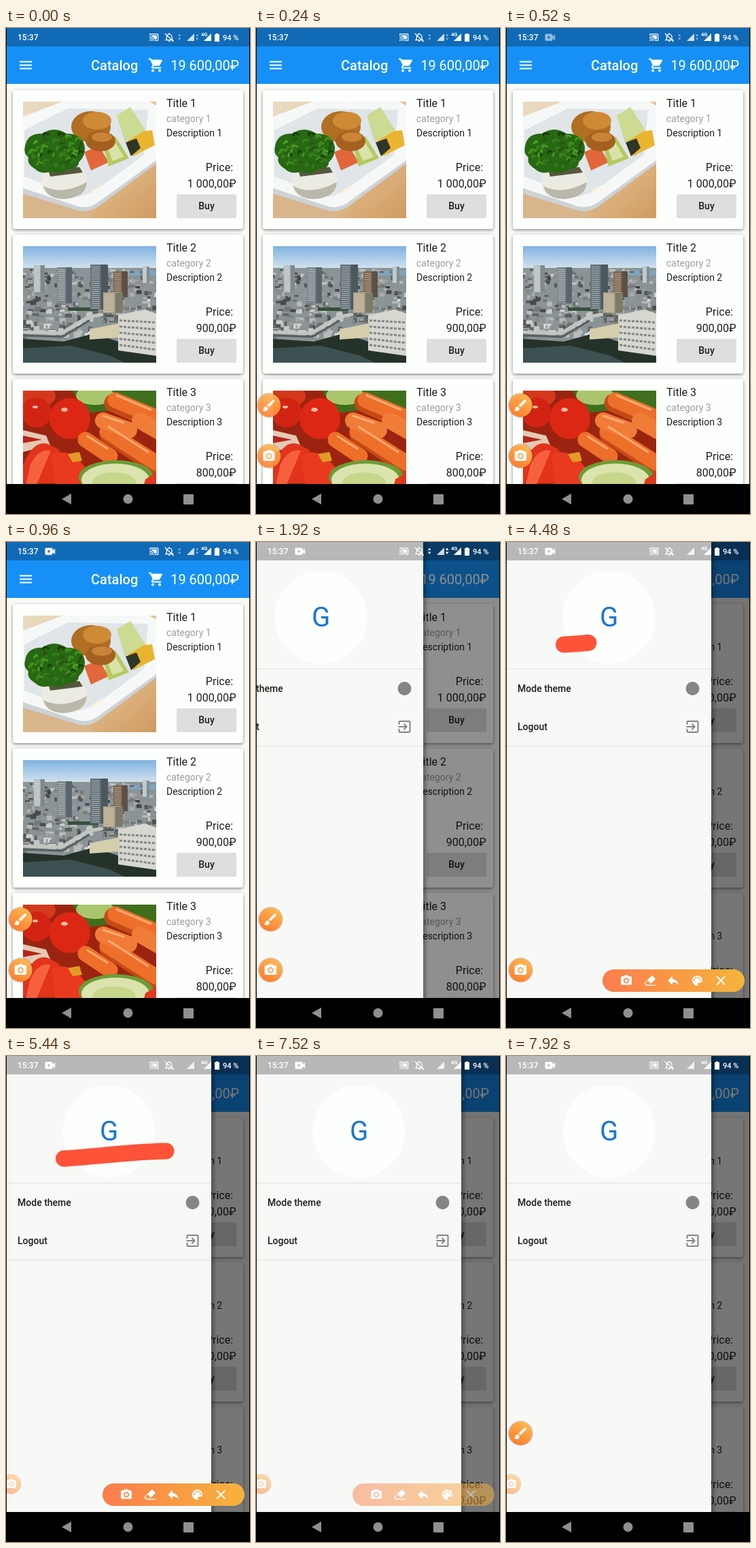
Recreate the animation shown at these times as an HTML page. Size 359 px wide and 713 px high, loop 8 s.

```html
<!DOCTYPE html>
<html lang="en">
<head>
<meta charset="utf-8">
<title>Catalog</title>
<style>
html, body { margin: 0; width: 100%; height: 100%; overflow: hidden; background: #000; }
svg { display: block; width: 100vw; height: 100vh; font-family: Roboto, sans-serif; }
.med { font-weight: 500; }
.end { text-anchor: end; }
.mid { text-anchor: middle; }
.anim { animation: 8s linear infinite; }

#fabs { animation-name: fabs; }
@keyframes fabs {
  0%, .49% { opacity: 0; transform: translateX(-26px); }
  .5% { opacity: .15; transform: translateX(-20px); animation-timing-function: ease-out; }
  4%, 100% { opacity: 1; transform: none; }
}
#rec { animation-name: rec; }
@keyframes rec {
  0%, 3% { opacity: 0; }
  6.5% { opacity: .55; }
  10.5% { opacity: .8; }
  11%, 100% { opacity: 1; }
}
#drawer { animation-name: drawer; }
@keyframes drawer {
  0%, 22.99% { transform: translateX(-315px); }
  23% { transform: translateX(-250px); }
  23.5% { transform: translateX(-150px); }
  24%, 24.99% { transform: translateX(-56px); }
  25% { transform: translateX(-32px); }
  26% { transform: translateX(-11px); }
  28%, 100% { transform: none; }
}
#scrim { animation-name: scrim; }
@keyframes scrim {
  0%, 22.99% { opacity: 0; }
  23% { opacity: .09; }
  23.5% { opacity: .27; }
  24%, 24.99% { opacity: .44; }
  25% { opacity: .48; }
  26% { opacity: .52; }
  28%, 100% { opacity: .54; }
}
#data { animation-name: data; }
@keyframes data {
  0%, 22.99% { opacity: .45; }
  23%, 34.99% { opacity: 1; }
  35%, 100% { opacity: 0; }
}
#brush { animation-name: brush; }
@keyframes brush {
  0%, 34.99% { opacity: 1; }
  36.5%, 97.49% { opacity: 0; }
  97.5%, 98.99% { opacity: .5; }
  99%, 100% { opacity: 1; }
}
#camera { animation-name: camera; transform-origin: 21px 628px; }
@keyframes camera {
  0%, 65% { opacity: 1; transform: none; }
  68%, 100% { opacity: .5; transform: translateX(-14px) scale(.83); }
}
#tools { animation-name: tools; }
@keyframes tools {
  0%, 34.99% { opacity: 0; transform: translateX(60px); }
  35% { opacity: .1; transform: translateX(50px); animation-timing-function: ease-out; }
  38.5%, 93.99% { opacity: 1; transform: none; }
  94%, 95.49% { opacity: .5; transform: none; }
  95.5%, 100% { opacity: 0; transform: none; }
}
#stroke { animation-name: stroke; stroke-dasharray: 1 2; }
@keyframes stroke {
  0%, 54.99% { opacity: 0; stroke-dashoffset: .95; }
  55% { opacity: 1; stroke-dashoffset: .95; }
  60%, 93.99% { opacity: 1; stroke-dashoffset: 0; }
  94%, 100% { opacity: 0; stroke-dashoffset: 0; }
}
</style>
</head>
<body>
<svg viewBox="0 0 359 713" preserveAspectRatio="none">
  <defs>
    <linearGradient id="fabFill" x1="0" y1="1" x2=".6" y2="0">
      <stop stop-color="#ff7427"/><stop offset="1" stop-color="#ffb552"/>
    </linearGradient>
    <linearGradient id="barFill">
      <stop stop-color="#fb7d4d"/><stop offset="1" stop-color="#f6b43c"/>
    </linearGradient>
    <linearGradient id="edge">
      <stop stop-opacity=".3"/><stop offset="1" stop-opacity="0"/>
    </linearGradient>
    <linearGradient id="wood" x1="0" y1="0" x2="1" y2="1">
      <stop stop-color="#e9dcc4"/><stop offset=".5" stop-color="#e6c594"/><stop offset="1" stop-color="#d09a62"/>
    </linearGradient>
    <linearGradient id="sky" x2="0" y2="1">
      <stop stop-color="#7fb2e0"/><stop offset="1" stop-color="#dbe7ef"/>
    </linearGradient>
    <clipPath id="frame"><path d="M0 0h196v171H0z"/></clipPath>
    <clipPath id="screen"><path d="M1 0h357v669H1z"/></clipPath>
    <filter id="shadow" x="-5%" y="-5%" width="110%" height="115%">
      <feDropShadow dx="0" dy="1.5" stdDeviation="1.9" flood-opacity=".48"/>
    </filter>

    <path id="iMenu" d="M3 18h18v-2H3zM3 13h18v-2H3zM3 6v2h18V6z"/>
    <g id="iCart">
      <circle cx="7" cy="20" r="2"/><circle cx="17" cy="20" r="2"/>
      <path d="M1 2v2h2l3.6 7.6-1.35 2.4C4.5 15.4 5.5 17 7 17h12v-2H7.4c-.2 0-.3-.2-.2-.4l.9-1.6h7.45c.75 0 1.4-.4 1.75-1l3.6-6.5c.3-.7-.1-1.5-.9-1.5H5.2l-.95-2z"/>
    </g>
    <path id="iExit" d="M10.1 15.6l1.4 1.4 5-5-5-5-1.4 1.4 2.6 2.6H3v2h9.7zM19 3H5a2 2 0 0 0-2 2v4h2V5h14v14H5v-4H3v4a2 2 0 0 0 2 2h14a2 2 0 0 0 2-2V5a2 2 0 0 0-2-2z"/>
    <path id="iCast" d="M21 3H3a2 2 0 0 0-2 2v3h2V5h18v14h-7v2h7a2 2 0 0 0 2-2V5a2 2 0 0 0-2-2zM1 18v3h3a3 3 0 0 0-3-3zm0-4v2a5 5 0 0 1 5 5h2a7 7 0 0 0-7-7zm0-4v2a9 9 0 0 1 9 9h2A11 11 0 0 0 1 10zM5 7v1.6c4 1.3 7.1 4.4 8.4 8.4H19V7z"/>
    <g id="iBell" fill="none" stroke="#fff" stroke-width="2">
      <path d="M4 18h16l-2-2v-5a6 6 0 0 0-12 0v5zM12 5V2M10 21h4M2 3l20 19"/>
    </g>
    <g id="iPhoto">
      <path d="M9 2L7.2 4H4a2 2 0 0 0-2 2v12a2 2 0 0 0 2 2h16a2 2 0 0 0 2-2V6a2 2 0 0 0-2-2h-3.2L15 2zm3 15a5 5 0 1 1 0-10 5 5 0 0 1 0 10z"/>
      <circle cx="12" cy="12" r="3"/>
    </g>
    <path id="iBrush" d="M7 14a3 3 0 0 0-3 3c0 1.3-1.2 2-2 2 .9 1.2 2.5 2 4 2a4 4 0 0 0 4-4 3 3 0 0 0-3-3zM20.7 4.6l-1.3-1.3a1 1 0 0 0-1.4 0L9 12.3 11.7 15l9-9a1 1 0 0 0 0-1.4z"/>
    <g id="iErase">
      <path d="M15.5 3l6 6L10 20.5H6L2 16.5z"/>
      <path d="M8 11.5l5.5 5.5-2.5 2H7l-3-3z" fill="#fa9448"/>
      <path d="M10 19.2h11v1.5H9z"/>
    </g>
    <path id="iReply" d="M10 9V4l-8 8 8 8v-5c5 0 8.5 1.6 11 5-1-5-4-10-11-11z"/>
    <path id="iPalette" fill-rule="evenodd" d="M12 2a10 10 0 0 0 0 20c1 0 1.7-.8 1.7-1.7 0-1-.8-1.3-.8-2.2 0-.9.7-1.7 1.7-1.7H17a5 5 0 0 0 5-5C22 6 17.5 2 12 2zM6 9a1.7 1.7 0 1 1 0 3.4A1.7 1.7 0 0 1 6 9zm3.300-4.4a1.700 1.7 0 1 1 0 3.4 1.7 1.7 0 0 1 0-3.4zm5.400 0a1.7 1.7 0 1 1 0 3.4 1.7 1.7 0 0 1 0-3.4zM18 9a1.7 1.7 0 1 1 0 3.4A1.7 1.7 0 0 1 18 9z"/>
    <path id="iClose" d="M4 4l16 16M20 4L4 20" stroke="#fff" stroke-width="2.6"/>
    <path id="iVideo" fill-rule="evenodd" d="M17 10V7a2 2 0 0 0-2-2H4a2 2 0 0 0-2 2v10a2 2 0 0 0 2 2h11a2 2 0 0 0 2-2v-3l5 4V6zM9.5 9.5a2.5 2.5 0 1 1 0 5 2.5 2.5 0 0 1 0-5z"/>
    <path id="iArrows" d="M0 5l2.2-3.5L4.4 5zM0 7.5h4.4L2.2 11z"/>

    <g id="photo1">
      <path fill="url(#wood)" d="M0 0h196v171H0z"/>
      <path fill="#d9b58c" d="M0 134l100 30v7H0z"/>
      <path fill="#f6f8f8" d="M0 22L58 0H186l10 6v84l-84 60q-13 11-30 8L0 134z"/>
      <path fill="#dfe5e8" d="M2 42L66 10 184 12l-6 66-74 54-22 8-80-30z"/>
      <path fill="#ccd2d6" d="M0 127l82 27q16 3 28-6l86-62v5l-84 62q-14 10-30 7L0 135z"/>
      <path fill="#ecebe2" d="M28 106q8-18 36-16 26 0 31 26 0 24-36 27-30-2-31-22z"/>
      <path fill="#55583f" d="M37 100l46-4 5 8-48 6z"/>
      <path fill="#b9b8aa" d="M30 124q28 14 64-6-1 23-35 25-24-1-29-19z"/>
      <path fill="#e2673a" d="M90 74l22-9 14 24-26 12z"/>
      <path fill="#e9b531" d="M150 46l40-4 4 22-32 16z"/>
      <path fill="#2f3626" d="M151 60l16-6 6 14-14 12z"/>
      <path fill="#b4c95f" d="M116 58l20-7 20 32-30 12z"/>
      <path fill="#d9e3a9" d="M122 62l12-5 14 24-16 6z"/>
      <path fill="#cdda92" d="M138 20l20-12 22 34-30 18z"/>
      <ellipse fill="#b06f22" cx="100" cy="37" rx="29" ry="23"/>
      <ellipse fill="#cf8a36" cx="109" cy="28" rx="21" ry="13"/>
      <ellipse fill="#a5601f" cx="114" cy="58" rx="22" ry="15"/>
      <ellipse fill="#c98438" cx="116" cy="52" rx="15" ry="7"/>
      <path fill="#276812" d="M3 66q3-20 25-19 18-12 36 0 24 0 27 20 1 13-9 22 0 10-15 10-14 10-24 3-16 6-25-3-13-8-10-17-8-7-5-16z"/>
      <g id="leaves" fill="none" stroke-width="3" stroke-linecap="round"></g>
      <path fill="#fff3dc" d="M101 131l15-9-2 7-12 6z"/>
    </g>
    <g id="photo2">
      <path fill="url(#sky)" d="M0 0h196v36H0z"/>
      <path fill="#8a9496" d="M0 32h196v139H0z"/>
      <path fill="#7fa5bd" d="M152 36h44v7h-44z"/>
      <g id="city"></g>
      <path fill="#35503a" d="M66 90h45v5H66z"/>
      <g id="towers"></g>
      <path fill="#253229" d="M0 136l60 4 44-12 36 12 56 18v13H0z"/>
      <path fill="#3d5153" d="M0 150l70-4 56 14 24 11H0z"/>
      <path fill="none" stroke="#c3c6bf" stroke-width="5" d="M0 126l56 2 40-24 22-4"/>
      <path fill="none" stroke="#565f61" stroke-width="3" d="M0 131l58 2 40-24"/>
      <path fill="#d7d7cf" d="M140 101l40-8 16 6v62l-56-8z"/>
      <path fill="none" stroke="#7f8886" stroke-width="3" stroke-dasharray="4 2" d="M142 109l54 3M142 118l54 4M142 127l54 5M142 136l54 6M142 145l54 7"/>
      <path fill="#d5ceac" d="M98 122l44-9v21l-44 3z"/>
    </g>
    <g id="photo3">
      <path fill="#9b2410" d="M0 0h196v171H0z"/>
      <path fill="#3f6f1c" d="M72 0h124v35l-54-8-46 6z"/>
      <ellipse fill="#a9c66c" cx="106" cy="7" rx="28" ry="14"/>
      <ellipse fill="#d4391c" cx="20" cy="8" rx="28" ry="17"/>
      <circle fill="#d32413" cx="20" cy="32" r="22"/>
      <circle fill="#dc2714" cx="69" cy="41" r="30"/>
      <g fill="#ffb9a0"><ellipse cx="61" cy="28" rx="5" ry="3"/><ellipse cx="18" cy="24" rx="4" ry="2"/></g>
      <g fill="none" stroke-linecap="round">
        <path stroke="#c44a15" stroke-width="27" d="M133 18l63 28M126 64l70 46"/>
        <path stroke="#ee6f2a" stroke-width="23" d="M136 14l64 27M124 60l72 46M92 72l36 24"/>
        <path stroke="#f17c38" stroke-width="24" d="M118 44l38 14M172 44l28 16"/>
        <path stroke="#ffab70" stroke-width="3" d="M138 7l50 21M118 37l30 10M126 53l58 37M95 67l29 18"/>
      </g>
      <path fill="#e4c9b4" d="M0 58l34 8 6 14-40 10z"/>
      <path fill="#b52619" d="M0 66l28 6-28 5z"/>
      <path fill="#e2331c" d="M0 110q15-38 36-32l16 8 28 50H0z"/>
      <path fill="#f5603d" d="M11 108q12-24 30-20l-21 50H4z"/>
      <path fill="#e93a20" d="M42 94q27-13 52 22l-7 28H48z"/>
      <path fill="#e39b27" d="M66 93l17-3 4 13-14 2z"/>
      <ellipse fill="#6b9d36" cx="137" cy="127" rx="55" ry="25"/>
      <ellipse fill="#dbe3ae" cx="136" cy="131" rx="50" ry="24"/>
      <ellipse fill="#c6d68b" cx="134" cy="134" rx="32" ry="14"/>
      <path fill="#dd3a20" d="M180 130l16-10v51h-26z"/>
    </g>
  </defs>

  <path d="M0 0h359v713H0z"/>
  <g clip-path="url(#screen)">
    <path fill="#f8faf8" d="M0 0h359v670H0z"/>
    <g id="cards"></g>
    <path fill="#1690f6" d="M0 0h359v82H0z"/>
    <g fill="#fff">
      <use href="#iMenu" x="17" y="42.5"/>
      <text x="125" y="62" font-size="20" class="med">Catalog</text>
      <use href="#iCart" x="209" y="42.5"/>
      <text x="343" y="62" font-size="20" class="end">19 600,00₽</text>
    </g>
    <path id="scrim" class="anim" d="M0 0h359v670H0z"/>

    <g id="drawer" class="anim">
      <path fill="url(#edge)" d="M302 0h8v670h-8z"/>
      <path fill="#f7f9f7" d="M-20 0h322v670H-20z"/>
      <circle cx="151.5" cy="110.5" r="68" fill="#fdfffd"/>
      <text x="151.5" y="124" font-size="40" class="mid" fill="#1976d2">G</text>
      <path stroke="#dfe1df" d="M0 186.5h302M0 299.5h302"/>
      <g font-size="14" class="med" fill="#1d1f1d">
        <text x="17" y="220">Mode theme</text>
        <text x="17" y="276">Logout</text>
      </g>
      <g fill="#848684">
        <circle cx="274.5" cy="215" r="10"/>
        <use href="#iExit" x="262.5" y="259"/>
      </g>
    </g>

    <path fill-opacity=".26" d="M0 0h359v27H0z"/>
    <g fill="#fff">
      <text x="17" y="18" font-size="12" class="med">15:37</text>
      <g id="rec" class="anim"><use href="#iVideo" transform="translate(56 5) scale(.73)"/></g>
      <use href="#iCast" transform="translate(210.5 6.5) scale(.6)"/>
      <use href="#iBell" transform="translate(232.5 6) scale(.64)"/>
      <path d="M277 8v11h-11z" fill-opacity=".8"/>
      <path d="M302 8v11h-11z"/>
      <g id="data" class="anim">
        <use href="#iArrows" x="253" y="7"/><use href="#iArrows" x="279" y="7"/>
      </g>
      <text x="287" y="12" font-size="7.5" font-weight="700">4G</text>
      <path d="M307 9h2V8h3v1h2v11h-7z"/>
      <text x="319" y="18" font-size="11" class="med">94 %</text>
    </g>

    <g id="fabs" class="anim">
      <g id="brush" class="anim"></g>
      <g id="camera" class="anim"></g>
    </g>
    <g id="tools" class="anim">
      <rect x="142" y="627" width="209" height="33" rx="16.5" fill="url(#barFill)"/>
    </g>
    <path id="stroke" class="anim" pathLength="1" fill="none" stroke="#ff5339" stroke-width="24" stroke-linecap="round" d="M85 150.5C130 148 175 141 235.5 139.5"/>
  </g>

  <g fill="#8f8f8f">
    <path d="M82 691l14-8v16z"/>
    <circle cx="179.5" cy="691" r="7"/>
    <rect x="261" y="684" width="15" height="15" rx="1"/>
  </g>
</svg>
<script>
const $ = id => document.getElementById(id);
const fill = (id, html) => { $(id).innerHTML += html; };

// 24-unit icon centred on a point
const icon = (name, x, y, size) =>
  `<use href="#${name}" fill="#fff" transform="translate(${x - size / 2} ${y - size / 2}) scale(${size / 24})"/>`;

const fab = (name, y, size) => `
  <circle cx="21.5" cy="${y}" r="18.5" fill-opacity=".16"/>
  <circle cx="21.5" cy="${y}" r="17.2" fill="url(#fabFill)"/>${icon(name, 21.5, y, size)}`;

const card = (price, i) => `
  <g transform="translate(0 ${i * 212})" fill="#1d1f1d">
    <rect x="10" y="91" width="339" height="204" rx="4" fill="#fdfffd" filter="url(#shadow)"/>
    <g transform="translate(25 108)" clip-path="url(#frame)"><use href="#photo${i + 1}"/></g>
    <text x="236" y="116" font-size="16">Title ${i + 1}</text>
    <text x="236" y="137.5" font-size="14" fill="#9c9e9c">category ${i + 1}</text>
    <text x="236" y="158.5" font-size="14">Description ${i + 1}</text>
    <text x="334" y="210" font-size="16" class="end">Price:</text>
    <text x="338.5" y="234" font-size="16" class="end">${price}₽</text>
    <rect x="251" y="244" width="88" height="35" rx="2" fill="#dddfdd"/>
    <text x="295" y="266" font-size="14" class="med mid">Buy</text>
  </g>`;

let seed = 11;
const rand = () => (seed = (seed * 16807) % 2147483647) / 2147483647;
const box = (x, y, w, h, color) => `<rect x="${x}" y="${y}" width="${w}" height="${h}" fill="${color}"/>`;

// Curly greens scattered over an oval
let leaves = '';
for (let i = 0; i < 70; i++) {
  const a = rand() * 7, r = Math.sqrt(rand());
  const x = 47 + Math.cos(a) * r * 40, y = 73 + Math.sin(a) * r * 26;
  leaves += `<path d="M${x} ${y}q${rand() * 8 - 4} -6 ${rand() * 8} -2" stroke="hsl(102 65% ${14 + rand() * 26}%)"/>`;
}
fill('leaves', leaves);

// Roofs get larger toward the river
let city = '';
for (let i = 0; i < 330; i++) {
  const depth = i / 330, tone = 55 + depth * 20 + rand() * 150;
  city += box(rand() * 200 - 4, 33 + depth * 98, 3 + rand() * (4 + depth * 6), 2 + rand() * (3 + depth * 5),
    `rgb(${tone},${tone + 3},${tone + 2})`);
}
fill('city', city);

const tower = ([x, y, w, h, color]) =>
  box(x, y, w, h, color) + box(x + w * .6, y, w * .4, h, 'rgba(20,35,45,.35)') +
  `<path d="M${x + w * .3} ${y + 3}v${h - 5}" stroke="#e2e5e3" stroke-opacity=".5" stroke-width="${w * .45}" stroke-dasharray="1 2"/>`;
fill('towers', [
  [16, 28, 16, 40, '#b9bfc0'], [50, 31, 22, 53, '#7f898e'], [99, 27, 26, 66, '#68747b'],
  [133, 37, 21, 38, '#80684f'], [118, 68, 29, 30, '#b7a88a'], [176, 30, 10, 24, '#bac5ca']
].map(tower).join(''));

fill('cards', ['1 000,00', '900,00', '800,00'].map(card).join(''));
fill('brush', fab('iBrush', 553.5, 23));
fill('camera', fab('iPhoto', 628, 21));
fill('tools', ['iPhoto', 'iErase', 'iReply', 'iPalette', 'iClose']
  .map((name, i) => icon(name, 177 + i * 34.8, 643.5, [19, 21, 20, 18, 18][i])).join(''));
</script>
</body>
</html>
```
